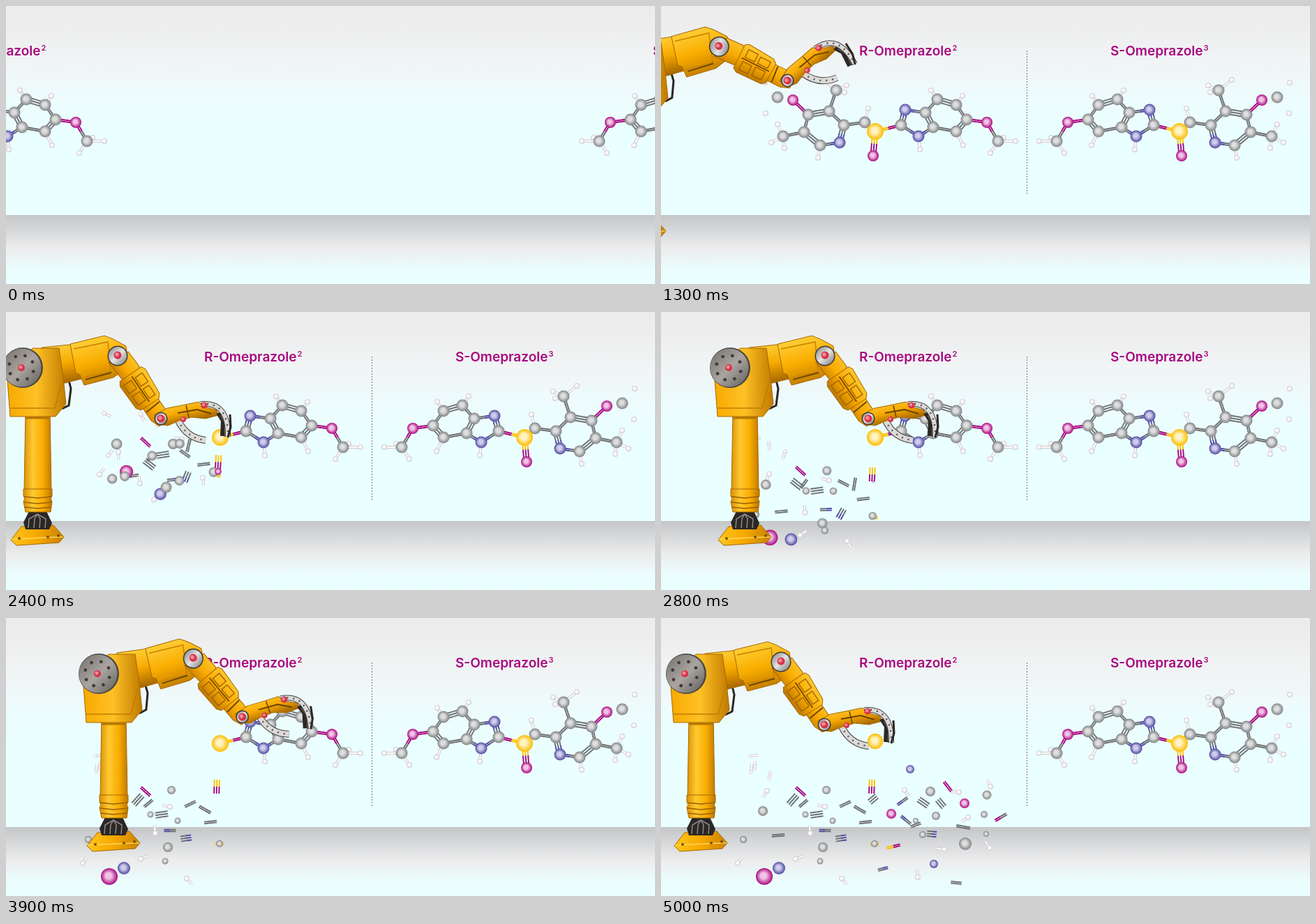
An HTML page with a canvas that plays this animation: 930 px wide and 399 px high, repeating every 5.1 s.

```html
<!DOCTYPE html>
<html lang="en">
<head>
<meta charset="utf-8">
<title>Omeprazole enantiomers</title>
<style>
html, body { margin: 0; height: 100%; overflow: hidden; }
canvas { display: block; }
</style>
</head>
<body>
<canvas id="stage" width="930" height="399"></canvas>
<script>
const ctx = document.getElementById('stage').getContext('2d');
const LOOP = 5100, STEP = 100, RAD = Math.PI / 180, MIRROR = 1050;

// Element: highlight, rim, bond colour, radius
const ELEMENTS = {
  C: ['#dededf', '#818385', '#6d6f71', 8.5],
  O: ['#f3c3e5', '#a8087f', '#a8087f', 8],
  N: ['#cfccec', '#4e499e', '#4e499e', 8.5],
  S: ['#fff3c4', '#ffbd00', '#ffc000', 12],
  H: ['#ffffff', '#d2c9cf', '#cfc6cc', 4]
};

// Element, x, y, then resting x, y and radius after the break-up
const leftAtoms = [
  ['C', 167, 131, 146, 277, 7], ['O', 189, 135, 148, 371, 12], ['C', 211, 156, 207, 282, 4.5],
  ['C', 241, 151, 237, 247, 6], ['C', 262, 171, 228, 349, 4.5], ['N', 256, 196, 169, 359, 9],
  ['C', 228, 200, 232, 329, 7], ['C', 205, 181, 118, 318, 5], ['C', 251, 121, 246, 291, 4.5],
  ['C', 175, 187, 118, 318, 5], ['C', 292, 167, 306, 324, 5], ['O', 304, 215, 304, 250, 0]
];
const rightAtoms = [
  ['S', 307, 180, 307, 177, 11], ['O', 344, 171, 330, 281, 7], ['C', 344, 171, 375, 311, 5],
  ['N', 350, 149, 357, 217, 6], ['N', 369, 187, 391, 353, 6], ['C', 379, 153, 386, 249, 7],
  ['C', 390, 174, 394, 284, 6], ['C', 396, 134, 436, 324, 9], ['C', 423, 142, 467, 254, 6.5],
  ['C', 438, 163, 463, 282, 5], ['C', 423, 180, 365, 291, 4], ['O', 467, 167, 435, 266, 7],
  ['C', 483, 194, 466, 310, 4]
];
const atoms = [...leftAtoms, ...rightAtoms];
const LEFT = leftAtoms.length, SULFUR = LEFT;

// End colours, atom, atom, line count, resting x, y and angle
const leftBonds = [
  ['OO', 1, 2, 2, 200, 249, 42], ['CC', 2, 3, 3, 223, 282, -8], ['CC', 3, 4, 2, 264, 267, -25],
  ['CN', 4, 5, 3, 258, 316, -8], ['NC', 5, 6, 2, 235, 305, 0], ['CC', 6, 7, 3, 189, 261, -48],
  ['CC', 7, 2, 2, 204, 266, -40], ['CC', 3, 8, 2, 285, 275, 30], ['CC', 7, 9, 2, 168, 312, -4],
  ['CC', 4, 10, 2, 293, 293, -6], ['SS', 10, 12, 2, 306, 324, 0], ['SO', 12, 11, 3, 302, 242, 92]
];
const rightBonds = [
  ['SO', 12, 14, 2, 333, 328, -14], ['CN', 14, 15, 3, 388, 310, 5], ['NC', 15, 17, 2, 346, 263, -35],
  ['CC', 17, 18, 3, 401, 266, 50], ['CN', 18, 16, 2, 318, 360, -15], ['NC', 16, 14, 2, 351, 290, 40],
  ['CC', 17, 19, 2, 365, 297, -20], ['CC', 19, 20, 3, 376, 265, 35], ['CC', 20, 21, 2, 423, 380, 6],
  ['CC', 21, 22, 3, 304, 260, -40], ['CC', 22, 18, 2, 433, 300, 10], ['OO', 21, 23, 2, 411, 242, 52],
  ['OC', 23, 24, 2, 487, 286, -30]
];

// Parent atom, x, y, resting x, y
const hydrogens = [
  [0, 149, 110, 128, 198], [0, 150, 154, 110, 352], [9, 167, 170, 152, 248], [9, 158, 196, 129, 221],
  [9, 177, 204, 214, 309], [8, 232, 106, 135, 208], [8, 266, 114, 156, 222], [8, 263, 124, 235, 271],
  [6, 225, 218, 193, 346], [10, 297, 147, 259, 374], [19, 387, 121, 349, 247], [20, 432, 129, 427, 250],
  [22, 433, 200, 406, 332], [16, 371, 206, 368, 372], [24, 508, 194, 471, 330], [24, 472, 211, 472, 242],
  [24, 491, 189, 440, 286]
];

// Time, arm shift, upper arm turn, forearm turn
const armKeys = [
  [700, -360, -2, -29], [1200, -88, -2, -29], [1300, -88, -2, -29], [1900, -87, -1, -9.5],
  [2100, -87, 0, 0], [2700, 63, 0, 0], [3000, 63, 0, 0], [3400, 98, -2, -16],
  [3900, 97, -2, -5.5], [4100, 98, 0, 0], [4900, 0, 0, 0], [LOOP, 0, 0, 0]
];

const clamp = v => Math.max(0, Math.min(1, v));
const mix = (a, b, p) => a + (b - a) * p;

function line(points, color, width) {
  ctx.beginPath();
  points.forEach(([x, y]) => ctx.lineTo(x, y));
  ctx.strokeStyle = color;
  ctx.lineWidth = width;
  ctx.stroke();
}

function poly(points, fill, edge) {
  ctx.beginPath();
  points.forEach(([x, y]) => ctx.lineTo(x, y));
  ctx.closePath();
  ctx.fillStyle = fill;
  ctx.fill();
  if (edge) { ctx.strokeStyle = edge; ctx.lineWidth = 1; ctx.stroke(); }
}

function disc(x, y, r, fill) {
  ctx.beginPath();
  ctx.arc(x, y, r, 0, 7);
  ctx.fillStyle = fill;
  ctx.fill();
}

function gradient(x0, y0, x1, y1, ...colors) {
  const g = ctx.createLinearGradient(x0, y0, x1, y1);
  colors.forEach((c, i) => g.addColorStop(i / (colors.length - 1), c));
  return g;
}

function ball(kind, x, y, r) {
  if (r <= 0) return;
  const [light, rim] = ELEMENTS[kind];
  const g = ctx.createRadialGradient(x - r * .15, y - r * .15, 0, x, y, r);
  g.addColorStop(0, light);
  g.addColorStop(.35, light);
  g.addColorStop(1, rim);
  disc(x, y, r, g);
}

function drawBond([ends, a, b, count, restX, restY, restAngle], p, mapX) {
  const [, xa, ya] = atoms[a], [, xb, yb] = atoms[b];
  const ax = mapX(xa), bx = mapX(xb), dist = Math.hypot(bx - ax, yb - ya);
  let angle = Math.atan2(yb - ya, bx - ax);
  if (p > 0) {
    const turn = Math.sin(restAngle * RAD - angle) * Math.cos(restAngle * RAD - angle);
    angle = p < 1 ? angle + turn * p : restAngle * RAD;
  }
  const half = mix(dist, Math.min(dist * .6, 20), clamp(p * 4)) / 2;
  ctx.save();
  ctx.translate(mix((ax + bx) / 2, restX, p), mix((ya + yb) / 2, restY, p));
  ctx.rotate(angle);
  const gap = count === 3 ? 3.6 : 2.6;
  for (let i = 0; i < count; i++) {
    const y = (i - (count - 1) / 2) * gap;
    line([[-half, y], [0, y]], ELEMENTS[ends[0]][2], 1.9);
    line([[0, y], [half, y]], ELEMENTS[ends[1]][2], 1.9);
  }
  ctx.restore();
}

function drawHydrogen([parent, x, y, restX, restY], i, p, mapX) {
  const [, px, py] = atoms[parent];
  const dx = mapX(px) - mapX(x), dy = py - y;
  const angle = Math.atan2(dy, dx) + p * (i % 3 - 1);
  const length = mix(Math.hypot(dx, dy), 11, clamp(p * 4));
  const hx = mix(mapX(x), restX, p), hy = mix(y, restY, p);
  const end = [hx + Math.cos(angle) * length, hy + Math.sin(angle) * length];
  const r = restX < 160 && restY < 230 ? mix(4, 2.5, p) : 4;
  if (parent || p) {
    line([[hx, hy], end], ELEMENTS.H[2], 4);
    line([[hx, hy], end], '#fff', 2);
  }
  ball('H', hx, hy, r);
}

function drawMolecule(first, second, mapX) {
  leftBonds.forEach(b => drawBond(b, first, mapX));
  rightBonds.forEach(b => drawBond(b, second, mapX));
  const phase = i => i < LEFT ? first : second;
  hydrogens.forEach((h, i) => drawHydrogen(h, i, phase(h[0]), mapX));
  atoms.forEach(([kind, x, y, rx, ry, rr], i) => {
    const p = phase(i);
    ball(kind, mix(mapX(x), rx, p), mix(y, ry, p), mix(ELEMENTS[kind][3], rr, p));
  });
}

function drawTitle(text, note, x) {
  ctx.fillStyle = '#a8087f';
  ctx.font = '600 19px Inter, sans-serif';
  ctx.fillText(text, x, 71);
  const width = ctx.measureText(text).width;
  ctx.font = '600 11px Inter, sans-serif';
  ctx.fillText(note, x + width + 1, 64);
}

function drawBackground() {
  const g = ctx.createLinearGradient(0, 0, 0, 399);
  [[0, '#ececec'], [27, '#ededed'], [75, '#f1f4f5'], [135, '#edfcfd'], [180, '#eaffff'], [300, '#eaffff'],
   [300, '#c5c6c8'], [325, '#d8dadb'], [347, '#ececed'], [378, '#ebfdfd'], [399, '#eaffff']]
    .forEach(([y, c]) => g.addColorStop(y / 399, c));
  ctx.fillStyle = g;
  ctx.fillRect(0, 0, 930, 399);
}

const EDGE = '#a76800', DARK = '#2a2725';

function redPin(x, y, r) {
  disc(x, y, r, '#d8334a');
  disc(x - r * .2, y - r * .2, r * .5, '#f28b98');
}

function metalJoint(x, y, r) {
  disc(x, y, r, '#3c3a39');
  disc(x, y, r - 1.5, gradient(x - r, y - r, x + r, y + r, '#777', '#e4e4e4', '#6a6a6a'));
}

function drawPedestal() {
  poly([[34, 308], [80, 306], [95, 323], [88, 331], [27, 335], [19, 327]], gradient(19, 0, 95, 0, '#ffc51a', '#f6a800', '#c88100'), EDGE);
  line([[20, 326], [86, 323], [94, 323]], '#ffd658', 1.5);
  [[31, 325], [72, 323], [87, 321]].forEach(([x, y]) => disc(x, y, 2, '#7d5200'));
  poly([[45, 286], [70, 286], [78, 303], [74, 312], [40, 312], [37, 302]], DARK);
  [44, 52, 60, 68].forEach(x => line([[x, 310], [x + 1, 297], [57, 290]], '#8d8b89', 1.5));

  const column = gradient(36, 0, 79, 0, '#d58c00', '#ffc931', '#f9ad00', '#b87200');
  poly([[40, 140], [75, 140], [77, 258], [38, 258]], column, EDGE);
  poly([[37, 254], [78, 254], [78, 264], [76, 268], [78, 272], [76, 287], [40, 287], [37, 272], [39, 268], [37, 264]], column, EDGE);
  [265, 273, 280].forEach(y => line([[38, y], [57, y + 2], [77, y]], '#9b6000', 1.5));
  line([[40, 152], [75, 152]], '#b67500', 3);
}

function drawUpperArm() {
  line([[100, 90], [105, 110], [102, 134], [92, 139]], DARK, 3);
  poly([[63, 51], [112, 46], [128, 94], [96, 102], [70, 100]], gradient(80, 48, 92, 102, '#ffcf3a', '#f8ab00', '#a96900'), EDGE);
  poly([[104, 46], [153, 34], [166, 39], [184, 49], [188, 78], [166, 94], [124, 105], [118, 90], [112, 88]],
    gradient(130, 38, 150, 104, '#ffcf37', '#f9ad00', '#be7900'), EDGE);
  line([[109, 53], [158, 43], [162, 86], [123, 94]], '#c78200', 1.5);
  line([[126, 97], [163, 87]], '#6e4700', 2);
}

function drawShoulder() {
  poly([[14, 98], [50, 52], [88, 52], [94, 94], [98, 132], [83, 150], [18, 150]], gradient(14, 0, 98, 0, '#f7a900', '#ffc125', '#c07a00'), EDGE);
  line([[17, 138], [82, 138], [92, 100]], '#c17d00', 1.5);
  disc(36, 80, 29, '#494746');
  disc(35, 80, 27.5, gradient(10, 55, 62, 106, '#77736f', '#aaa5a0', '#625f5c'));
  for (let i = 0; i < 8; i++) {
    const a = i * Math.PI / 4 + .3;
    disc(34 + Math.cos(a) * 18, 80 + Math.sin(a) * 18, 2.4, '#3e3b39');
  }
  redPin(34, 80, 5);
}

function drawFinger(start, control, end, width) {
  ctx.beginPath();
  ctx.moveTo(...start);
  ctx.quadraticCurveTo(...control, ...end);
  for (const [color, w] of [['#444240', width], ['#dcdad9', width - 2]]) {
    ctx.strokeStyle = color;
    ctx.lineWidth = w;
    ctx.stroke();
  }
  ctx.setLineDash([2, 7]);
  ctx.strokeStyle = '#55514f';
  ctx.lineWidth = 2.5;
  ctx.stroke();
  ctx.setLineDash([]);
}

function drawForearm() {
  ctx.save();
  ctx.translate(172, 63);
  ctx.rotate(55.5 * RAD);
  const gold = gradient(0, -20, 0, 22, '#ffc62a', '#f9aa00', '#bc7600');
  poly([[4, -16], [30, -17], [34, -12], [88, -13], [106, -13], [117, -6], [117, 8], [104, 13], [86, 13], [32, 14], [0, 16]], gold, EDGE);
  poly([[32, -19], [38, -22], [78, -19], [84, -14], [83, 17], [77, 21], [38, 22], [32, 18]], gold, EDGE);
  [[40, -15, 15, 12], [60, -13, 16, 10], [40, 4, 14, 13], [60, 3, 15, 13]].forEach(([x, y, w, h]) => {
    ctx.strokeStyle = '#9b6100';
    ctx.lineWidth = 1.3;
    ctx.strokeRect(x, y, w, h);
  });
  line([[36, 0], [80, 0]], '#805000', 2);
  line([[88, -12], [90, 12]], '#6f4700', 2);
  ctx.restore();

  drawFinger([258, 154], [270, 181], [298, 184], 10);
  poly([[224, 148], [243, 138], [264, 134], [288, 129], [300, 137], [314, 141], [317, 148], [298, 153], [278, 151], [260, 156], [244, 163], [229, 161]],
    gradient(255, 130, 262, 160, '#ffca35', '#f8a900', '#a86a00'), EDGE);
  line([[258, 145], [286, 140], [306, 146]], '#684400', 2);
  line([[270, 134], [274, 151]], '#684400', 1.5);
  line([[316, 145], [323, 156], [322, 178]], DARK, 6);
  line([[320, 148], [328, 160], [327, 179]], '#55504e', 4);
  drawFinger([291, 132], [331, 128], [330, 179], 8);
  line([[333, 147], [334, 165], [330, 180]], DARK, 3);
  redPin(296, 134, 4.5);
  redPin(266, 154, 4);
  metalJoint(234, 153, 9.5);
  redPin(234, 153, 5.5);
  metalJoint(172, 63, 14.5);
  redPin(172, 62, 5.5);
}

function turnAround(x, y, degrees) {
  ctx.translate(x, y);
  ctx.rotate(degrees * RAD);
  ctx.translate(-x, -y);
}

function drawArm(t) {
  if (t < armKeys[0][0]) return;
  const i = armKeys.findIndex(k => k[0] > t), from = armKeys[i - 1], to = armKeys[i];
  const p = (t - from[0]) / (to[0] - from[0]);
  const [, shift, upper, fore] = from.map((v, k) => mix(v, to[k], p));
  ctx.save();
  ctx.translate(shift, 0);
  drawPedestal();
  ctx.save();
  turnAround(36, 80, upper);
  drawUpperArm();
  turnAround(172, 63, fore - upper);
  drawForearm();
  ctx.restore();
  drawShoulder();
  ctx.restore();
}

function render(t) {
  drawBackground();
  const away = 1 - clamp(t / 700), leftShift = -367 * away, rightShift = 283 * away;
  const first = clamp((t - 2000) / 1000), second = clamp((t - 4000) / 1000);

  ctx.globalAlpha = clamp((t - 700) / 300);
  ctx.setLineDash([2, 2]);
  line([[524.5, 64], [524.5, 271]], '#77797b', 1);
  ctx.setLineDash([]);
  ctx.globalAlpha = 1;

  drawTitle('R-Omeprazole', '2', 284 + leftShift);
  drawTitle('S-Omeprazole', '3', 644 + rightShift);
  drawMolecule(0, 0, x => MIRROR - x + rightShift);
  drawMolecule(first, second, x => x + leftShift);
  drawArm(t);
  if (second > 0) {
    const [kind, , y, x, restY, r] = atoms[SULFUR];
    ball(kind, x, mix(y, restY, second), r);
  }
}

const begin = performance.now();
function tick() {
  const t = (performance.now() - begin) % LOOP;
  render(Math.floor(t / STEP) * STEP);
  requestAnimationFrame(tick);
}
tick();
</script>
</body>
</html>
```
